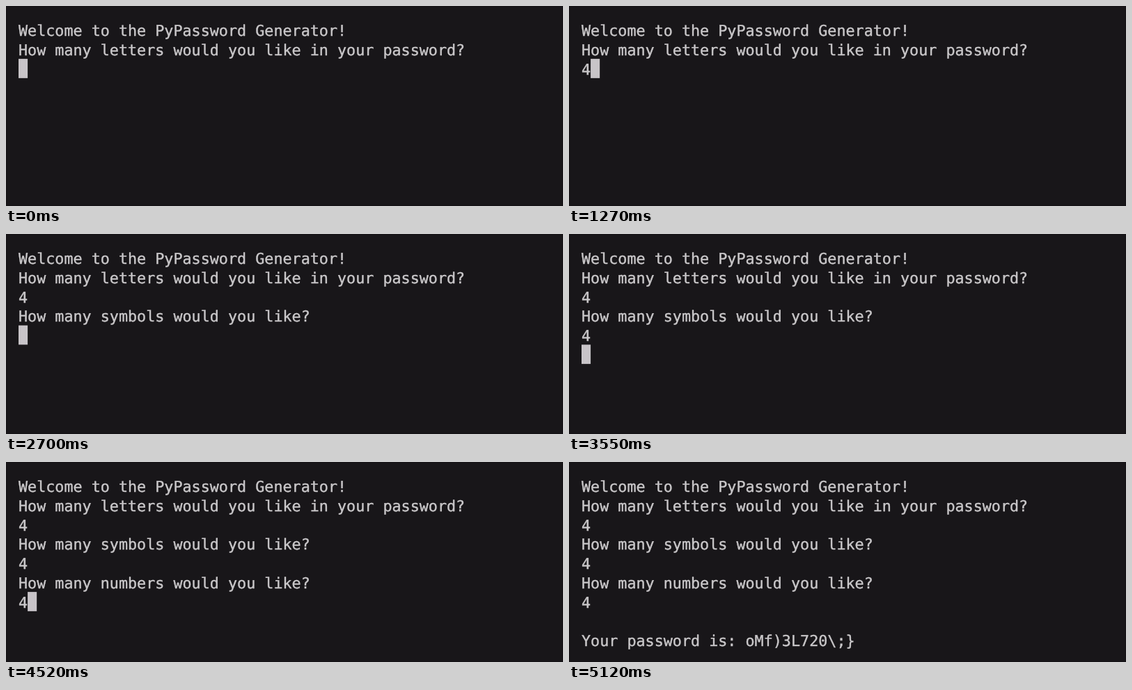
These frames come from a looping animation (800x288 px, 7 s). An HTML page with a canvas:

```html
<!DOCTYPE html>
<html lang="en">
<head>
<meta charset="utf-8">
<style>
  html, body { margin: 0; width: 100%; height: 100%; overflow: hidden; background: #181619; }
  canvas { display: block; }
</style>
</head>
<body>
<canvas id="stage" width="800" height="288"></canvas>
<script>
const ctx = document.getElementById('stage').getContext('2d');
const LOOP = 7000, LEFT = 18, TOP = 20.6, BASE = 43, LINE = 27.75, CHAR = 13.09;

// Terminal output: [time in ms, text appended]
const output = [
  [0, 'Welcome to the PyPassword Generator!\nHow many letters would you like in your password?\n'],
  [1270, '4'],
  [2450, '\n'],
  [2700, 'How many symbols would you like?\n'],
  [3270, '4'],
  [3550, '\n'],
  [3760, 'How many numbers would you like?\n'],
  [4520, '4'],
  [4940, '\n'],
  [5120, '\nYour password is: oMf)3L720\\;}']
];
const END = 5120;

ctx.font = '21.74px "DejaVu Sans Mono", monospace';
ctx.textRendering = 'geometricPrecision';
ctx.lineWidth = 0.4;
ctx.lineJoin = 'round';

function draw(now) {
  const t = now % LOOP;
  const lines = output.filter(([at]) => at <= t).map(([, text]) => text).join('').split('\n');

  ctx.fillStyle = '#151316';
  ctx.fillRect(0, 0, 800, 288);
  ctx.fillStyle = '#181619';
  ctx.fillRect(2, 2, 796, 284);

  // The thin outline gives the strokes their slightly heavier weight
  ctx.fillStyle = ctx.strokeStyle = '#cac8ca';
  lines.forEach((text, i) => {
    ctx.fillText(text, LEFT, BASE + i * LINE);
    ctx.strokeText(text, LEFT, BASE + i * LINE);
  });

  if (t < END) {
    const row = lines.length - 1;
    ctx.fillStyle = '#c8c4c8';
    ctx.fillRect(LEFT + lines[row].length * CHAR, TOP + row * LINE, CHAR, LINE);
  }
  requestAnimationFrame(draw);
}
requestAnimationFrame(draw);
</script>
</body>
</html>
```
